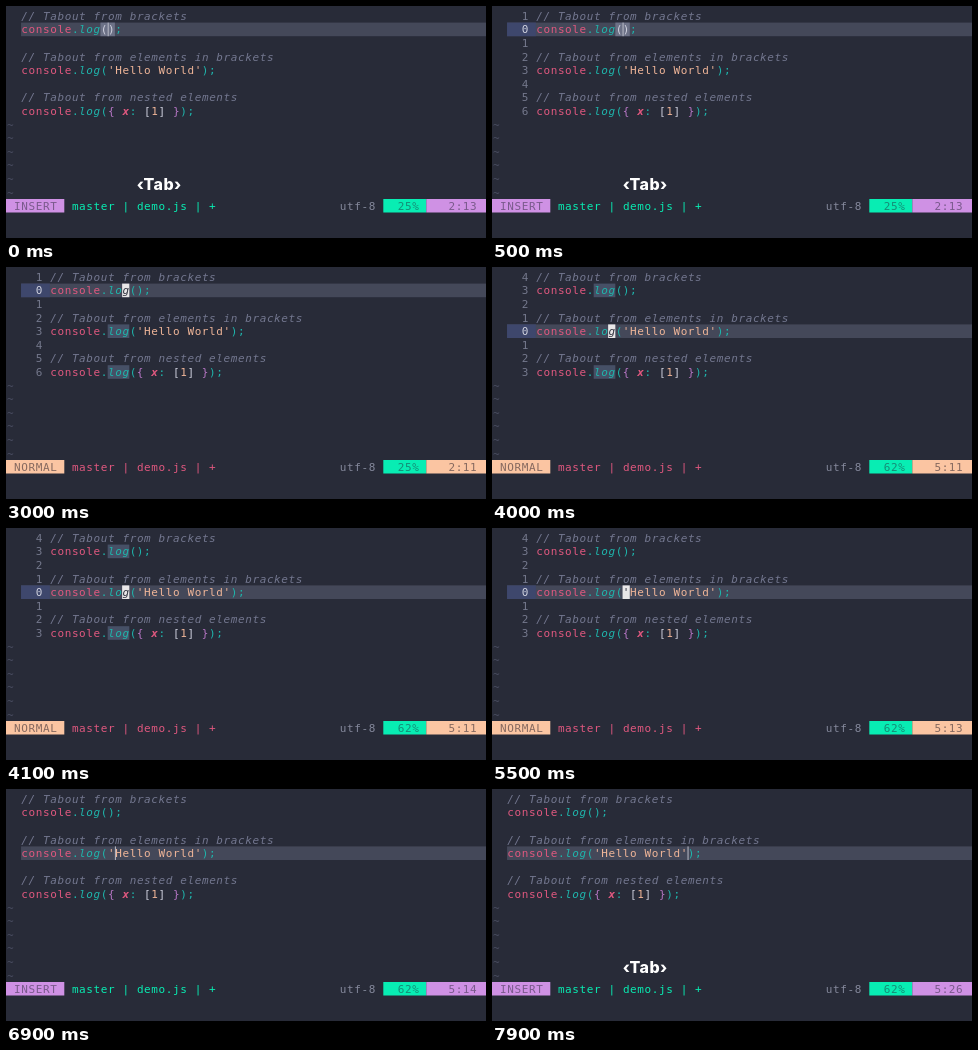
Animation, 480 px wide and 233 px high, one loop 8 s. Source, as an HTML page with a canvas:

```html
<!DOCTYPE html>
<html lang="en">
<head>
<meta charset="utf-8">
<title>Tabout demo</title>
<style>
html, body { margin: 0; width: 100%; height: 100%; overflow: hidden; background: #282b38; }
canvas { display: block; width: 480px; height: 233px; }
</style>
</head>
<body>
<canvas id="stage"></canvas>
<script>
const W = 480, H = 233, LOOP = 8000;
const CELL = 7.22, ROW = 13.6, LEFT = 0.6, TOP = 3;
const MONO = '11px "DejaVu Sans Mono", "Liberation Mono", monospace';
const C = {
  bg: '#282b38', comment: '#73778f', pink: '#e0587f', teal: '#1fb5ac', peach: '#efb598',
  violet: '#b877c6', pale: '#cfd1de', num: '#74788c', tilde: '#4a4e61', line: '#444859',
  gutter: '#3e476c', word: '#465066', paren: '#6c7186', block: '#e9e7e8', bar: '#b9bbc6',
  insert: '#cf91e4', insertText: '#7a5a8c', normal: '#fbc5a2', normalText: '#86695f',
  aqua: '#08edb3', aquaText: '#158c76', dark: '#30333f', grey: '#85899c'
};

const canvas = document.getElementById('stage');
const ctx = canvas.getContext('2d');
const dpr = window.devicePixelRatio || 1;
canvas.width = W * dpr;
canvas.height = H * dpr;
ctx.scale(dpr, dpr);

// Each line is a list of [text, colour, font style].
const comment = s => [['// ' + s, C.comment, 'italic']];
const call = (...args) => [
  ['console', C.pink], ['.', C.teal], ['log', C.teal, 'italic'], ['(', C.teal],
  ...args, [');', C.teal]
];
const lines = [
  comment('Tabout from brackets'),
  call(),
  [],
  comment('Tabout from elements in brackets'),
  call(["'Hello World'", C.peach]),
  [],
  comment('Tabout from nested elements'),
  call(['{ ', C.violet], ['x', C.pink, 'italic bold'], [': ', C.teal], ['[', C.pale],
    ['1', C.peach], ['] ', C.pale], ['}', C.violet])
];

// Editor states: start, line, column, insert mode, numbers, word marks, bracket marks
const states = [
  [0, 2, 13, 1, 0, 0, 1],
  [400, 2, 13, 1, 1, 0, 1],
  [1500, 2, 12, 1, 1, 1, 0],
  [2300, 2, 11, 0, 1, 1, 0],
  [3900, 5, 11, 0, 1, 1, 0],
  [4700, 5, 12, 0, 1, 0, 0],
  [5500, 5, 13, 0, 1, 0, 0],
  [6800, 5, 14, 1, 0, 0, 0],
  [7400, 5, 26, 1, 0, 0, 0]
];

const rowY = r => TOP + r * ROW;
const baseline = r => 13.7 + r * ROW;
const colX = c => LEFT + c * CELL;

function rect(x, y, w, h, color) {
  ctx.fillStyle = color;
  ctx.fillRect(x, y, w, h);
}

function text(s, x, y, color, style = '') {
  ctx.font = style + ' ' + MONO;
  ctx.letterSpacing = '0.6px';
  ctx.fillStyle = color;
  ctx.fillText(s, x + 0.3, y);
}

function drawLine(r, x) {
  for (const [s, color, style] of lines[r]) {
    text(s, x, baseline(r), color, style);
    x += s.length * CELL;
  }
}

function drawEditor(line, col, insert, numbers, words, parens) {
  const cur = line - 1;
  const indent = numbers ? 6 : 2;
  const cell = c => colX(indent + c - 1);
  const y = rowY(cur);

  rect(colX(2), y, W, ROW, C.line);
  if (numbers) rect(colX(2), y, CELL * 4, ROW, C.gutter);
  if (words) {
    for (const r of [1, 4, 7]) if (r !== cur) rect(cell(9), rowY(r), CELL * 3, ROW, C.word);
  }
  lines.forEach((_, r) => {
    if (numbers) text(Math.abs(r - cur), colX(4), baseline(r), r === cur ? C.pale : C.num);
    drawLine(r, colX(indent));
  });
  for (let r = 8; r < 14; r++) text('~', colX(0), baseline(r), C.tilde);

  if (parens) {
    rect(cell(12), y, CELL * 2, ROW, C.paren);
    text('()', cell(12), baseline(cur), C.pale);
  }
  if (insert) {
    rect(cell(col), y, 1, ROW, C.bar);
  } else {
    const chars = lines[cur].map(part => part[0]).join('');
    rect(cell(col), y, CELL, ROW, C.block);
    text(chars[col - 1], cell(col), baseline(cur), C.dark, col < 12 ? 'italic' : '');
  }
}

function drawStatus(line, col, insert) {
  const y = 193, h = 13.5, base = baseline(14);
  const main = insert ? C.insert : C.normal;
  const ink = insert ? C.insertText : C.normalText;
  const place = line + ':' + col;
  rect(0, y, 58.3, h, main);
  rect(377.3, y, 43, h, C.aqua);
  rect(420.3, y, W, h, main);
  text(insert ? 'INSERT' : 'NORMAL', colX(1), base, ink);
  text('master | demo.js | +', colX(9), base, insert ? C.aqua : C.pink);
  text('utf-8', 333.5, base, C.grey);
  text(Math.floor(line / lines.length * 100) + '%', 391.5, base, C.aquaText);
  text(place, 471 - place.length * CELL, base, ink);
}

// Three-step fade beginning at the given time
const fade = (t, start) => Math.min(1, Math.max(0, (t - start + 100) / 300));

function drawKey(s, x, alpha) {
  if (alpha <= 0) return;
  ctx.globalAlpha = alpha;
  ctx.font = '800 16px Inter, Lato, sans-serif';
  ctx.letterSpacing = '0.4px';
  ctx.fillStyle = '#fff';
  ctx.textAlign = 'center';
  ctx.fillText(s, x, 183.7);
  ctx.textAlign = 'left';
  ctx.globalAlpha = 1;
}

function draw(now) {
  const t = Math.floor(now % LOOP / 100) * 100;
  const [, line, col, insert, numbers, words, parens] = states.filter(s => s[0] <= t).pop();
  rect(0, 0, W, H, C.bg);
  drawEditor(line, col, insert, numbers, words, parens);
  drawStatus(line, col, insert);
  drawKey('‹Tab›', 153.2, 1 - fade(t, 900) + fade(t, 7400));
  drawKey('‹S-Tab›', 335.7, fade(t, 1300) - fade(t, 2400));
  rect(0, H - 1, W, 1, '#000');
}

let start;
function tick(now) {
  start ??= now;
  draw(now - start);
  requestAnimationFrame(tick);
}
draw(0);
requestAnimationFrame(tick);
</script>
</body>
</html>
```
